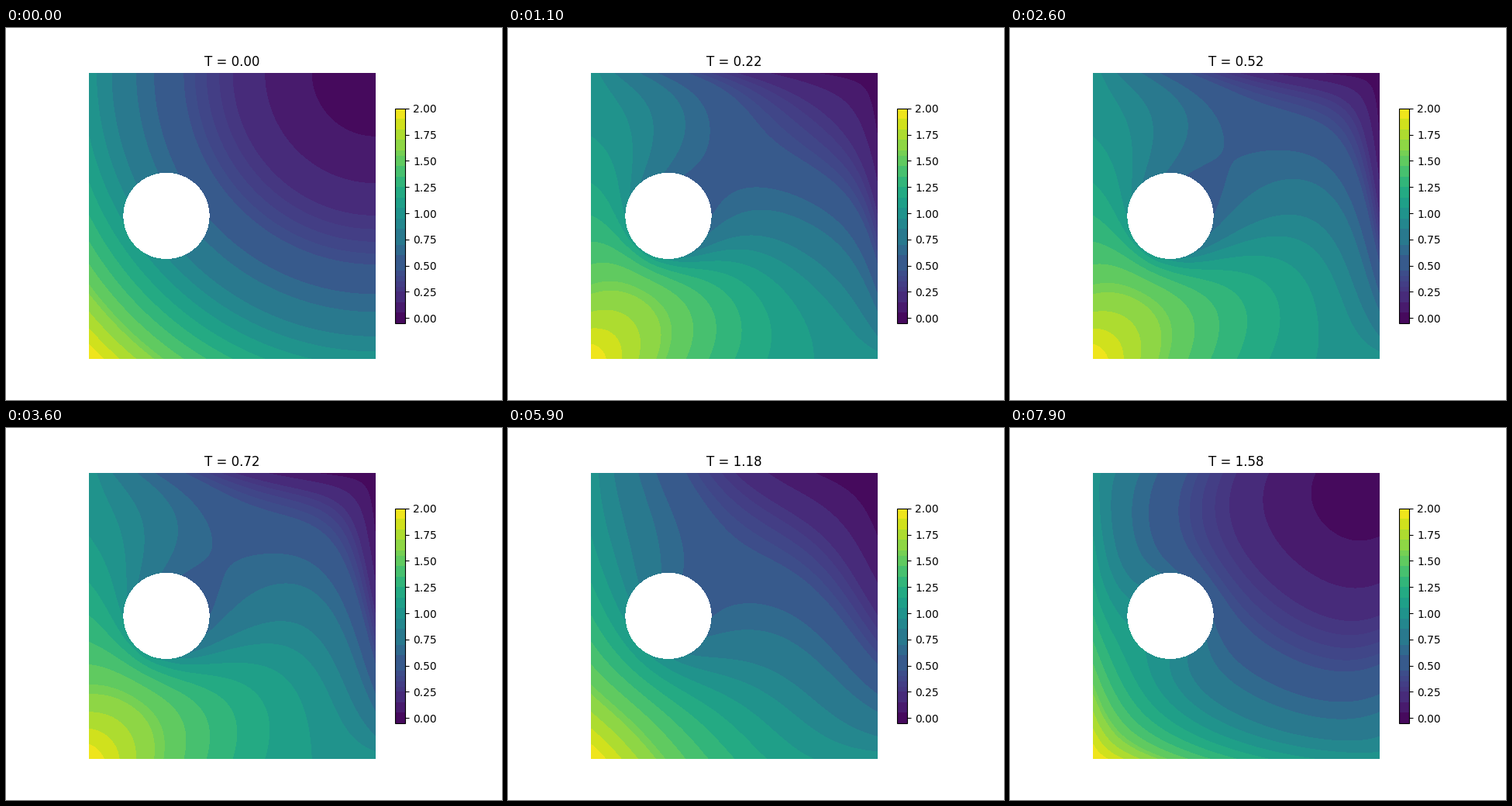
Animation, 640 px wide and 480 px high, one loop 8 s. Source, as a matplotlib script:

```python
import numpy as np
import matplotlib.pyplot as plt
from matplotlib.animation import FuncAnimation
from matplotlib.colors import BoundaryNorm, ListedColormap
from matplotlib.patches import Circle

FRAMES, DT = 80, 0.02
N, SUBSTEPS = 120, 125
NU, OMEGA = 0.1, 1.3
CENTER, RADIUS = (0.27, 0.5), 0.149

CUTS = [-.05, .05, .15, .25, .3, .35, .4, .45, .6, .7, .85, .95, 1.05, 1.15,
        1.25, 1.35, 1.45, 1.55, 1.6, 1.7, 1.8, 1.9, 2.0]

axis = np.linspace(0, 1, N + 1)
X, Y = np.meshgrid(axis, axis)
T0 = (1 - X) ** 2 + (1 - Y) ** 2
hole = np.hypot(X - CENTER[0], Y - CENTER[1]) <= RADIUS
free = ~hole[1:-1, 1:-1]


def solve():
    """Advection-diffusion with an oscillating diagonal wind, walls held at T0."""
    h, dt = 1 / N, DT / SUBSTEPS
    w = np.zeros_like(T0)          # departure from the resting state
    push = 2 * (2 - X - Y)[1:-1, 1:-1]
    fields = [T0.copy()]
    for step in range((FRAMES - 1) * SUBSTEPS):
        c = np.cos(OMEGA * step * dt)
        e, v = w[1:-1, 2:], w[1:-1, :-2]
        n, s = w[2:, 1:-1], w[:-2, 1:-1]
        mid = w[1:-1, 1:-1]
        diff = NU / h ** 2 * (e + v + n + s - 4 * mid)
        adv = c * ((e - v + n - s) / (2 * h) - push)
        w[1:-1, 1:-1] = (mid + dt * (diff - adv)) * free
        if (step + 1) % SUBSTEPS == 0:
            fields.append(T0 + w)
    return [np.clip(f, -0.049, 2) for f in fields]


def band_color(lo, hi):
    mids = np.arange(lo + 0.025, hi, 0.05)
    return plt.cm.viridis((mids + 0.05) / 2.05)[:, :3].mean(axis=0)


fields = solve()
cmap = ListedColormap([band_color(a, b) for a, b in zip(CUTS, CUTS[1:])])
norm = BoundaryNorm(CUTS, cmap.N)

fig, ax = plt.subplots(figsize=(6.4, 4.8), dpi=100)


def fill(field):
    return ax.contourf(X, Y, field, levels=CUTS, cmap=cmap, norm=norm)


bands = fill(fields[0])
bar = fig.colorbar(bands, ax=ax, shrink=0.75, spacing="proportional",
                   ticks=np.arange(0, 2.01, 0.25), format="%.2f")
bar.minorticks_off()
ax.add_patch(Circle(CENTER, RADIUS, fc="white", ec="none", zorder=3,
                    antialiased=False))
ax.set(xlim=(0, 1), ylim=(0, 1), aspect="equal")
ax.axis("off")
title = ax.set_title("T = 0.00")


def update(i):
    global bands
    bands.remove()
    bands = fill(fields[i])
    title.set_text(f"T = {i * DT:.2f}")
    return [title]


anim = FuncAnimation(fig, update, frames=FRAMES, interval=100,
                     repeat=True, repeat_delay=0, blit=False)
plt.show()
```
